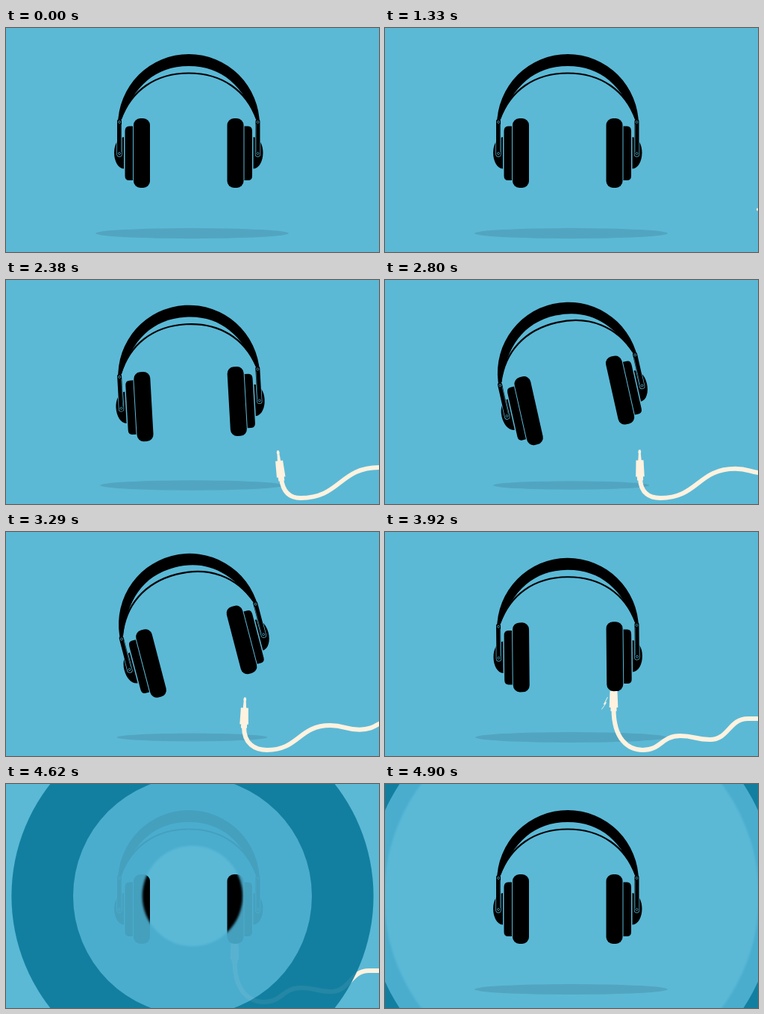
These frames come from a looping animation (500x300 px, 4970 ms). An HTML page:

```html
<!DOCTYPE html>
<html>
<head>
<meta charset="utf-8">
<style>
  html, body { margin: 0; width: 100%; height: 100%; overflow: hidden; background: #5bb9d6; }
  svg { display: block; width: 500px; height: 300px; }
</style>
</head>
<body>
<svg viewBox="0 0 500 300">
  <defs>
    <g id="cup">
      <path d="M158 146V188.500C150 188 145 178 145 167S150 147 158 146Z"/>
      <path d="M170 131.500V204H165Q159.500 204 159.500 198V138Q159.500 131.500 165 131.500Z"/>
      <rect x="171" y="121" width="22" height="93" rx="9"/>
      <path d="M152 147V169" stroke="#5bb9d6" stroke-width="7.400" stroke-linecap="round"/>
      <path d="M152 125V169" stroke="#000" stroke-width="6" stroke-linecap="round"/>
      <g fill="none" stroke="#5bb9d6" stroke-width=".7">
        <circle cx="152" cy="126" r="1.500"/>
        <circle cx="152" cy="168" r="1.500"/>
        <path d="M154.300 129V166" opacity=".6"/>
      </g>
    </g>
    <g id="phones">
      <path d="M150 130A95 95 0 0 1 340 130L336 124C318 78 290 51 245 51S172 78 154 124Z"/>
      <path d="M154 122C168 84 200 60.500 245 60.500S322 84 336 122" fill="none" stroke="#000" stroke-width="2.200"/>
      <use href="#cup"/>
      <use href="#cup" transform="translate(489.500) scale(-1 1)"/>
    </g>
    <g id="cable" fill="#fff2df">
      <path id="cord" fill="none" stroke="#fff2df" stroke-width="6"/>
      <path id="plug" d="M-1.200-38H1.200L2-35 1.500-33 2.200-24H5L5.800-2H4V3H-4V-2H-5.800L-5-24H-2.200L-1.500-33-2-35Z"/>
    </g>
    <ellipse id="shadow" cx="249.500" cy="275" fill="#52a5c0"/>
    <filter id="soft"><feGaussianBlur stdDeviation="1.500"/></filter>
    <mask id="reveal" maskUnits="userSpaceOnUse" x="0" y="0" width="500" height="300">
      <circle id="inner" cx="250" cy="150" fill="#fff" filter="url(#soft)"/>
    </mask>
    <clipPath id="within"><circle id="limit" cx="250" cy="150"/></clipPath>
  </defs>

  <rect width="500" height="300" fill="#5bb9d6"/>
  <use href="#shadow"/>
  <use href="#cable"/>
  <use href="#phones"/>
  <path id="spark" d="M298.500 221L293 231 295.500 230.500 290.500 237.500 297 228 295 228.500Z" fill="#fff2df" stroke="#fff2df" stroke-width=".5"/>

  <g id="wipe">
    <circle id="dark" cx="250" cy="150" fill="#137fa0"/>
    <circle id="mid" cx="250" cy="150" fill="#4badce"/>
    <g clip-path="url(#within)">
      <g id="ghost"><use href="#cable"/><use href="#phones"/></g>
    </g>
    <g mask="url(#reveal)">
      <rect width="500" height="300" fill="#5bb9d6"/>
      <use href="#shadow"/>
      <use href="#phones"/>
    </g>
  </g>
</svg>
<script>
const LOOP = 4970, STEP = 70;
const ENTER = 1330, TURNED = 2380, PLUGGED = 3880, WIPE = 583;
const $ = id => document.getElementById(id);
const set = (id, name, value) => $(id).setAttribute(name, value);
const show = (id, on) => set(id, 'visibility', on ? 'visible' : 'hidden');

const progress = (t, from, to) => Math.min(1, Math.max(0, (t - from) / (to - from)));
const ease = (t, from, to) => (1 - Math.cos(Math.PI * progress(t, from, to))) / 2;
const mix = (a, b, u) => a + (b - a) * u;

function drawCable(t) {
  // The plug slides in while turning upright, then drifts below the cup and rises into it
  const entry = progress(t, ENTER, TURNED), rise = progress(t, TURNED, PLUGGED);
  const x = mix(536, 369, entry) - 62.5 * (1 - (1 - rise) ** 1.72);
  const y = mix(243, 266, entry) - 29 * rise ** 3;
  const angle = mix(-90, -7, entry) + 7 * rise + 5 * Math.sin(Math.PI * rise);

  // The cord's troughs and crests trail the plug and bunch up as it slows
  const slack = rise ** 2;
  const waves = [
    [mix(26, 39, slack), mix(250, 292, ease(t, ENTER, TURNED))],
    [mix(131, 89, slack), mix(251, 273, slack)],
    [mix(170, 129, slack), mix(257, 278, slack)],
    [mix(220, 180, slack), 250]
  ];
  const rad = angle * Math.PI / 180, reach = 2 + 0.7 * Math.abs(waves[0][1] - y);
  let d = `M${x} ${y}`, px = x;
  let lead = [x - reach * Math.sin(rad), y + reach * Math.cos(rad)];
  for (const [dx, wy] of waves) {
    const wx = x + dx, half = (wx - px) / 2;
    d += `C${lead} ${wx - half} ${wy} ${wx} ${wy}`;
    px = wx;
    lead = [wx + half, wy];
    const next = waves[waves.findIndex(w => w[0] === dx) + 1];
    if (next) lead[0] = wx + (next[0] - dx) / 2;
  }
  set('cord', 'd', d + 'H520');
  set('plug', 'transform', `translate(${x} ${y}) rotate(${angle})`);
}

function drawPhones(t) {
  const tilt = 1.12 * (ease(t, 2070, 3115) - ease(t, 3115, 4030));
  const size = 1 - 0.216 * tilt;
  set('phones', 'transform', `translate(${tilt} ${-6 * tilt}) rotate(${-14.3 * tilt} 245 130)`);
  set('shadow', 'rx', 129.5 * size);
  set('shadow', 'ry', 7 * size);
}

function drawWipe(t) {
  const [outer, middle, inner] = [4205, 4298, 4428].map(from => ease(t, from, from + WIPE));
  show('wipe', outer > 0);
  set('dark', 'r', 300 * outer);
  set('limit', 'r', 300 * outer);
  set('mid', 'r', 275 * middle);
  set('inner', 'r', 275 * inner);
  set('ghost', 'opacity', 0.18 * (1 - middle));
}

function draw(now) {
  const t = Math.floor(now % LOOP / STEP) * STEP;
  show('cable', t >= ENTER);
  show('spark', t >= 3850 && t < 4000);
  drawCable(t);
  drawPhones(t);
  drawWipe(t);
  requestAnimationFrame(() => draw(performance.now() - start));
}

const start = performance.now();
draw(0);
</script>
</body>
</html>
```
